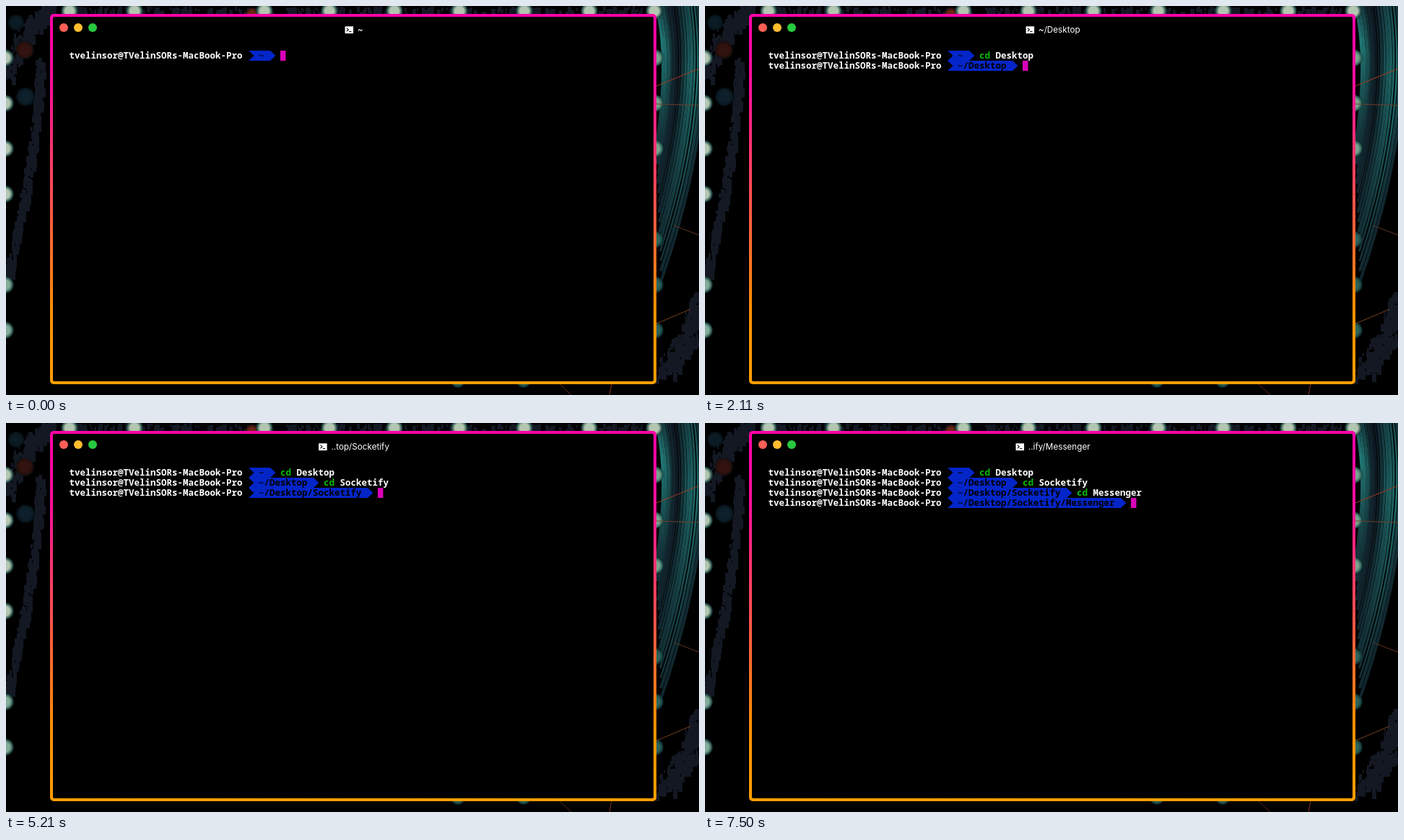
An HTML page with a canvas that plays this animation: 960x540 px, repeating every 8 s.

```html
<!DOCTYPE html>
<html lang="en">
<head>
<meta charset="utf-8">
<title>Terminal</title>
<style>
  html, body { margin: 0; width: 100%; height: 100%; overflow: hidden; background: #000; }
  canvas, svg { position: absolute; left: 0; top: 0; width: 960px; height: 540px; }
  text { white-space: pre; }
  #term text { font: 600 12.5px "Noto Sans Mono", "Liberation Mono", monospace; }
  #title text { font: 400 11.7px Inter, "Open Sans", sans-serif; fill: #fff; }
</style>
</head>
<body>
<canvas id="wall" width="960" height="540"></canvas>
<svg viewBox="0 0 960 540">
  <defs>
    <linearGradient id="edge" gradientUnits="userSpaceOnUse" x1="0" y1="11" x2="0" y2="525">
      <stop offset="0" stop-color="#ff00a8"/>
      <stop offset=".2" stop-color="#ff109a"/>
      <stop offset=".8" stop-color="#ff9000"/>
      <stop offset="1" stop-color="#ff9e00"/>
    </linearGradient>
  </defs>
  <rect x="61" y="11" width="840" height="514" rx="5" fill="url(#edge)"/>
  <rect x="65" y="15" width="832" height="506" rx="2" fill="#000"/>
  <circle cx="80" cy="30" r="6" fill="#ff5f56"/>
  <circle cx="100" cy="30" r="6" fill="#ffbd2e"/>
  <circle cx="120" cy="30" r="6" fill="#27c93f"/>
  <g id="title">
    <path id="icon" fill="#fff" d="M0 0H11.5V9.8H0Z"/>
    <path id="sign" fill="none" stroke="#000" stroke-width="1.1" d="M2.3 2.4L4.8 4.6L2.3 6.8M5.6 7.2H8.8"/>
    <text id="name" y="37"></text>
  </g>
  <g id="term"></g>
</svg>
<script>
const LOOP = 8000, CELL = 7.5, LEFT = 80, TOP = 62, ROW = 14;
const USER = 'tvelinsor@TVelinSORs-MacBook-Pro';
const WHITE = '#fff', GREEN = '#08bd08', RED = '#ff5f5f', GREY = '#666',
      BLUE = '#0425c8', PINK = '#d800b8', UNDER = '#4a1244';

// Each key adds one letter; the last one completes the command
const session = [
  { path: '~', at: 0, cmd: 'cd Desktop', keys: [720, 980, 1400, 1750] },
  { path: '~/Desktop', at: 2110, cmd: 'cd Socketify', keys: [3070, 3300, 3540, 4130, 4850] },
  { path: '~/Desktop/Socketify', at: 5210, cmd: 'cd Messenger', keys: [5570, 5750, 6170, 6880, 7180] },
  { path: '~/Desktop/Socketify/Messenger', at: 7500, cmd: '', keys: [] }
];
const ENTER = 7450;

const $ = id => document.getElementById(id);
const text = (s, x, row, color) =>
  s.trim() ? `<text x="${x}" y="${TOP + row * ROW + 11}" fill="${color}">${s}</text>` : '';
const cursor = (x, row) =>
  `<rect x="${x}" y="${TOP + row * ROW}" width="${CELL}" height="${ROW}" fill="${PINK}"/>`;
const inputX = row => LEFT + (USER.length + session[row].path.length + 7) * CELL;

function prompt(row) {
  const { path } = session[row];
  const y = TOP + row * ROW, mid = y + ROW / 2, end = y + ROW;
  const x = LEFT + (USER.length + 2) * CELL, a = x + 1, b = a + (path.length + 3) * CELL;
  return text(USER, LEFT + CELL, row, WHITE) +
    `<path fill="${BLUE}" d="M${a} ${y}H${b}L${b + CELL} ${mid}L${b} ${end}H${a}L${a + CELL} ${mid}Z"/>` +
    text(path, x + 2 * CELL, row, '#000');
}

function command(s, row) {
  const x = inputX(row);
  return text(s.slice(0, 2), x, row, s === 'c' ? RED : GREEN) +
    text(s.slice(3), x + 3 * CELL, row, WHITE);
}

// Newest earlier command that begins with the typed letters
function suggest(typed, row) {
  const past = session.slice(0, row).reverse().map(s => s.cmd);
  return past.find(c => c.startsWith(typed)) || session[row].cmd;
}

function inputLine(row, t) {
  const { cmd, keys } = session[row];
  const hit = keys.filter(k => k <= t).length;
  const n = hit && hit === keys.length ? cmd.length : hit;
  const typed = cmd.slice(0, n), x = inputX(row) + n * CELL;
  let out = prompt(row) + command(typed, row) + cursor(x, row);
  if (n) {
    const rest = suggest(typed, row).slice(n), tail = rest.slice(1).trimStart();
    out += text(rest.slice(0, 1), x, row, UNDER) +
      text(tail, x + (rest.length - tail.length) * CELL, row, GREY);
  }
  return out;
}

function drawTitle(path) {
  const name = $('name');
  name.textContent = path.length > 15 ? '..' + path.slice(-13) : path;
  const x = 482.2 - (name.getComputedTextLength() + 17.5) / 2;
  name.setAttribute('x', x + 17.3);
  for (const id of ['icon', 'sign']) $(id).setAttribute('transform', `translate(${x} 28.3)`);
}

function drawTerm(t) {
  const row = session.filter(s => s.at <= t).length - 1;
  const entered = t >= ENTER && t < session[3].at;
  let out = '';
  for (let r = 0; r < row; r++) out += prompt(r) + command(session[r].cmd, r);
  out += entered ? prompt(row) + command(session[row].cmd, row) + cursor(LEFT, row + 1) : inputLine(row, t);
  $('term').innerHTML = out;
  drawTitle(session[row].path);
}

function paintWall() {
  const g = $('wall').getContext('2d');
  const navy = '#131823';
  let seed = 7;
  const rnd = () => (seed = (seed * 16807) % 2147483647) / 2147483647;
  const mix = (a, b, k) => a + (b - a) * k;
  const bend = (a, b, c, t) => mix(mix(a, b, t), mix(b, c, t), t);

  // Blocky camouflage scattered along a curve
  function trail(w, n, x0, y0, x1, y1, x2, y2) {
    g.fillStyle = navy;
    for (let i = 0; i < n; i++) {
      const t = rnd(), s = 2 + Math.floor(rnd() * 5);
      const x = bend(x0, x1, x2, t) + (rnd() - .5) * w;
      const y = bend(y0, y1, y2, t) + (rnd() - .5) * w;
      g.fillRect(Math.round(x), Math.round(y), s, s * 2);
    }
  }

  // Nested arcs, brightest near the window and again near the stage edge
  function arcs(count) {
    for (let i = 0; i < count; i++) {
      const k = i / (count - 1);
      const glow = (.5 + .5 * Math.cos(k * 8.4)) * mix(.75, 1.1, rnd());
      const shade = g.createLinearGradient(0, 0, 0, 170 + 190 * k);
      const tone = v => `rgb(${mix(14, 34, v)},${mix(24, 122, v)},${mix(34, 118, v)})`;
      shade.addColorStop(0, tone(glow * .6));
      shade.addColorStop(.3, tone(glow));
      shade.addColorStop(1, tone(.2 * glow + .1));
      g.strokeStyle = shade;
      g.lineWidth = mix(2.5, 5.5, rnd());
      g.lineCap = 'round';
      g.beginPath();
      g.moveTo(900 + 62 * k, -5);
      g.quadraticCurveTo(920 + 64 * k, 70 + 90 * k, 902 + 6 * k, 190 + 190 * k);
      g.stroke();
    }
  }

  function glow(x, y, r, core, rim) {
    const f = g.createRadialGradient(x, y, 0, x, y, r);
    f.addColorStop(0, core);
    f.addColorStop(.48, core);
    f.addColorStop(.78, rim);
    f.addColorStop(1, 'rgba(0,20,25,0)');
    g.fillStyle = f;
    g.fillRect(x - r, y - r, 2 * r, 2 * r);
  }

  function ray(color, x0, y0, x1, y1) {
    g.strokeStyle = color;
    g.lineWidth = 1;
    g.beginPath();
    g.moveTo(x0, y0);
    g.lineTo(x1, y1);
    g.stroke();
  }

  g.fillStyle = '#000';
  g.fillRect(0, 0, 960, 540);

  trail(18, 220, 0, 95, 20, 30, 60, 0);
  trail(10, 300, 46, 75, 42, 200, 2, 370);
  trail(8, 260, 60, 4, 480, 5, 900, 4);
  arcs(15);
  trail(24, 260, 960, 400, 950, 460, 905, 510);

  glow(26, 61, 14, '#32130f', '#220e0c');
  glow(14, 23, 12, '#0b1c24', '#0a161e');
  glow(27, 126, 14, '#0d202b', '#0b1821');
  glow(341, 12, 11, '#6b2715', '#32130f');

  const pale = '#b3c6b1', mint = '#83ad9a', rim = '#2f574f', teal = '#2c655b', deep = '#183f3d';
  for (let i = 0; i < 10; i++) if (i !== 2) glow(88 + 90 * i, 7, 13, pale, rim);
  for (let i = 0; i < 7; i++) {
    const y = 72 + 63 * i;
    if (i !== 4) glow(-1, y, 13, i < 4 ? pale : mint, rim);
    if (i !== 3) glow(899, y, 13, i < 3 ? '#7ba48e' : teal, i < 3 ? teal : deep);
  }
  for (const x of [626, 717]) glow(x, 520, 11, teal, deep);

  ray('#a33c22', 901, 111, 960, 87);
  ray('#70402a', 901, 136, 960, 138);
  ray('#603421', 926, 305, 960, 318);
  ray('#77401f', 901, 441, 948, 421);
  ray('#5d2a1b', 766, 524, 783, 540);
  ray('#85301f', 839, 524, 836, 540);
}

const marks = [ENTER, ...session.flatMap(s => [s.at, ...s.keys])];
const begin = performance.now();
let shown = -1;

function frame(now) {
  const t = Math.max(0, now - begin) % LOOP;
  const step = Math.max(...marks.filter(m => m <= t));
  if (step !== shown) drawTerm(shown = step);
  requestAnimationFrame(frame);
}

paintWall();
frame(begin);
</script>
</body>
</html>
```
